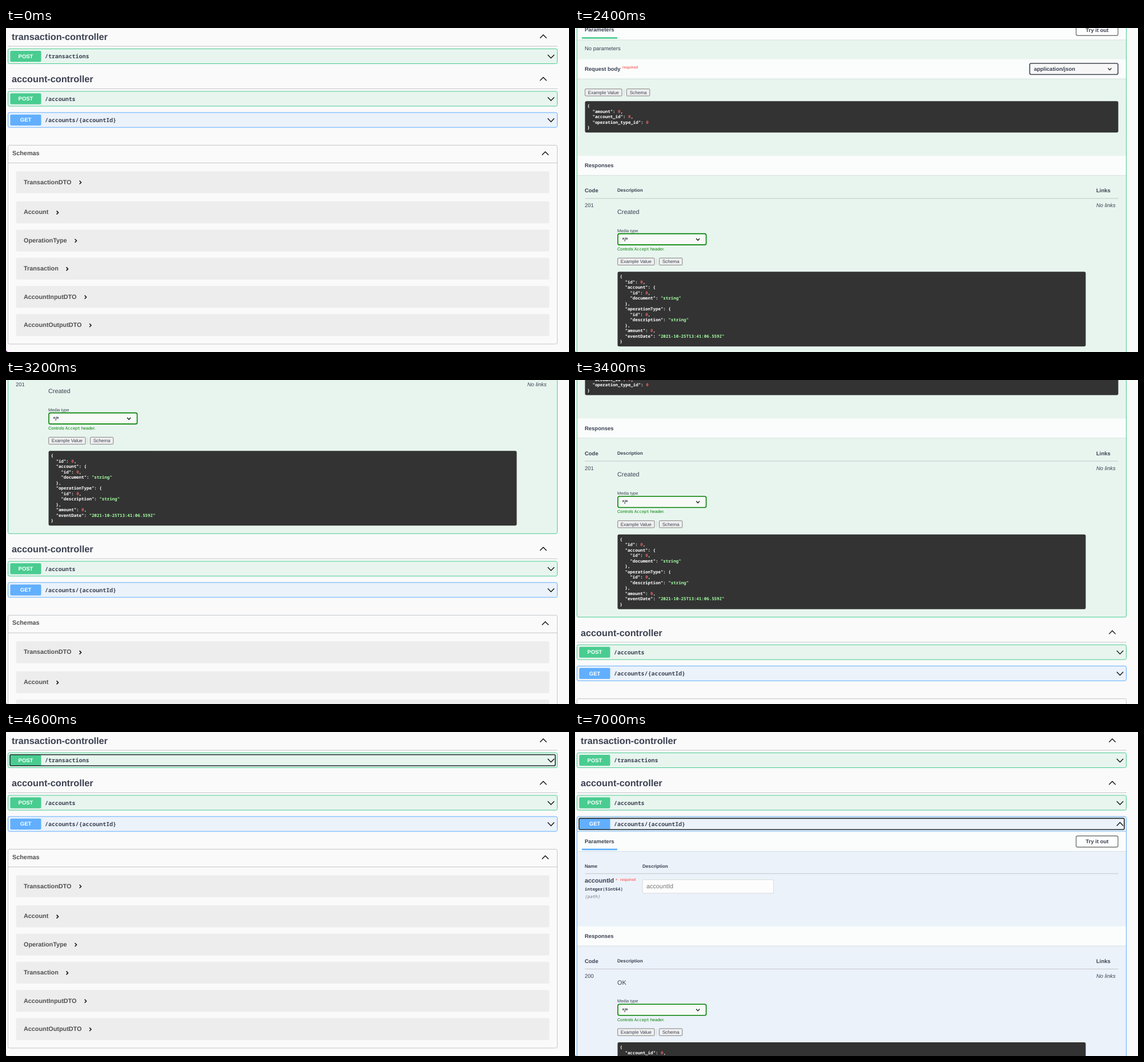
Recreate the animation shown at these times as an HTML page. Size 985x568 px, loop 8 s.

```html
<!DOCTYPE html>
<html lang="en">
<head>
<meta charset="utf-8">
<title>API documentation</title>
<style>
  html, body { margin: 0; width: 100%; height: 100%; overflow: hidden; background: #fafafa; }
  svg { display: block; }
  text { font-family: "Liberation Sans", Arial, sans-serif; fill: #3b4151; white-space: pre; text-rendering: geometricPrecision; }
  .bold { font-weight: 700; }
  .italic { font-style: italic; }
  .mono { font-family: "Noto Sans Mono", "DejaVu Sans Mono", monospace; }
  .mid { text-anchor: middle; }
  .white { fill: #fff; }
  .gray { fill: #505050; }
  .dim { fill: #777; }
  .red { fill: #ff6a6a; }
  .green { fill: #008000; }
  .num { fill: #d36363; }
  .str { fill: #a2fca2; }
</style>
</head>
<body>
<svg id="stage" width="985" height="568" viewBox="0 0 985 568"></svg>
<script>
const stage = document.getElementById('stage');
const RULE = '#c4c6ca', INK = '#3b4151';
const THEMES = {
  POST: { main: '#49cc90', tint: '#e8f5ef' },
  GET: { main: '#61affe', tint: '#ebf2fa' },
};

const OPERATIONS = [
  { method: 'POST', path: '/transactions', y: 0, grow: 586.5, responseShift: 0, code: 201, status: 'Created',
    body: { amount: 0, account_id: 0, operation_type_id: 0 }, bodyHeight: 55,
    response: { id: 0, account: { id: 0, document: 'string' },
      operationType: { id: 0, description: 'string' }, amount: 0, eventDate: '2021-10-25T13:41:06.559Z' } },
  { method: 'POST', path: '/accounts', y: 74.5, grow: 580, responseShift: -6.8, code: 201, status: 'Created',
    body: { document: 'string' }, bodyHeight: 48.3,
    response: { account_id: 0, document: 'string' } },
  { method: 'GET', path: '/accounts/{accountId}', y: 111.7, grow: 500, responseShift: -71.7, code: 200, status: 'OK',
    response: { account_id: 0, document: 'string' } },
];

const MODELS = [['TransactionDTO', 130], ['Account', 90], ['OperationType', 122],
  ['Transaction', 107], ['AccountInputDTO', 139], ['AccountOutputDTO', 147.5]];

const text = (x, y, content, size = 9.48, cls = '') =>
  `<text x="${x}" y="${y}" font-size="${size}" class="${cls}">${content}</text>`;
const box = (x, y, right, bottom, fill, stroke = 'none', width = 1, radius = 2.7) =>
  `<rect x="${x}" y="${y}" width="${right - x}" height="${bottom - y}" rx="${radius}" fill="${fill}" stroke="${stroke}" stroke-width="${width}"/>`;
const rule = (x, y, right, color = RULE) => box(x, y - .5, right, y + .5, color, 'none', 0, 0);
const group = (dy, content) => `<g transform="translate(0 ${dy})">${content}</g>`;
const chevron = (x, y, rx, ry, width = 1.4) =>
  `<path d="M${x - rx} ${y - ry}L${x} ${y + ry}L${x + rx} ${y - ry}" fill="none" stroke="#111" stroke-width="${width}"/>`;
const band = (y, bottom) =>
  box(4, y, 964, bottom, '#fafdfc', 'none', 0, 0) + rule(4, bottom + .3, 964, 'rgba(0,0,0,.09)');

function select(x, y, label, color, fill) {
  return box(x, y, x + 154.5, y + 19.5, fill, color, 1.6)
    + text(x + 7.5, y + 13.2, label, 9.48, 'bold') + chevron(x + 140, y + 10, 3, 1.6, 1.3);
}

function tabs(x, y) {
  const button = (left, right, label) => box(left, y, right, y + 12.3, '#efefef', '#777', .9, 1.2)
    + text((left + right) / 2, y + 9.1, label, 8.12, 'mid');
  return button(x, x + 64.3, 'Example Value') + box(x + 67.8, y, x + 68.6, y + 12.3, '#ccc')
    + button(x + 72.7, x + 113, 'Schema');
}

function codeBlock(x, y, right, height, value) {
  const lines = JSON.stringify(value, null, 2).split('\n').map((line, i) => {
    const colored = line.replace(/(: )(".*?"|\d+)/, (_, colon, token) =>
      `${colon}<tspan class="${token[0] === '"' ? 'str' : 'num'}">${token}</tspan>`);
    return text(x + 4, y + 11.2 + i * 9.48, colored, 7.45, 'mono bold white');
  });
  return box(x, y, right, y + height, '#333') + lines.join('');
}

const requestBody = op => text(17, 116, 'No parameters')
  + band(131.5, 165.6) + text(17, 151.7, 'Request body', 9.48, 'bold')
  + text(83, 147.8, 'required', 6.77, 'bold red')
  + select(795.5, 138.7, 'application/json', '#41444e', '#f7f7f7')
  + tabs(17.7, 183.5) + codeBlock(17.5, 204.9, 950.5, op.bodyHeight, op.body);

const pathParameter = () => text(17, 126.3, 'Name', 8.12, 'bold')
  + text(118, 126.3, 'Description', 8.12, 'bold') + rule(17.5, 136.5, 950.5)
  + text(17, 152.8, 'accountId', 10.83, 'bold') + text(71, 151.5, '*', 9, 'red')
  + text(79, 149.5, 'required', 6.77, 'bold red')
  + text(17, 166.3, 'integer($int64)', 7.45, 'mono bold')
  + text(17, 179.3, '(path)', 7.45, 'mono italic dim')
  + box(118, 147.2, 347.5, 171, '#fdfdfd', '#d9d9d9')
  + text(125, 162.7, 'accountId', 10.83, 'dim');

const responses = op => band(300.8, 334.8) + text(17, 320.9, 'Responses', 9.48, 'bold')
  + text(17, 364.9, 'Code', 9.48, 'bold') + text(74, 364.1, 'Description', 8.12, 'bold')
  + text(912, 364.9, 'Links', 9.48, 'bold') + rule(17.5, 375.5, 950.5)
  + text(17, 391.2, op.code) + text(912, 391.2, 'No links', 9.48, 'italic')
  + text(74, 402.8, op.status, 10.83) + text(74, 434.3, 'Media type', 7.45)
  + select(75, 437.3, '*/*', '#008000', '#f7faf7')
  + text(74, 466.5, 'Controls <tspan class="mono" font-size="7.2">Accept</tspan> header.', 7.45, 'green')
  + tabs(74.7, 480) + codeBlock(74.5, 504, 893.5, 131, op.response);

function operation(op, open, focused) {
  const { main, tint } = THEMES[op.method];
  let out = box(3.5, 36.5, 964.5, open ? 62.5 + op.grow : 62.5, tint, main);
  if (open) {
    out += rule(4, 62.5, 964, main) + band(63, 97.3)
      + text(17, 83.2, 'Parameters', 9.48, 'bold') + box(12, 92.8, 74, 95.5, main, 'none', 0, 0)
      + box(876.7, 70.5, 950, 90, '#fdfefe', '#777', 1.4) + text(913.5, 83.4, 'Try it out', 9.48, 'bold mid')
      + (op.body ? requestBody(op) : pathParameter())
      + group(op.responseShift, responses(op));
  }
  out += box(7.4, 40, 61.5, 59.2, main, 'none', 0, 2)
    + text(34.5, 52.8, op.method, 9.48, 'bold white mid')
    + text(68, 53.4, op.path, 9.93, 'mono bold');
  if (focused) out += box(7, 39.7, 961, 59.3, 'none', '#202a2c', 1.6, 2);
  return out + chevron(953.5, 49.8, 5.7, open ? -2.9 : 2.9);
}

const heading = name => text(10, 20.9, name, 16.25, 'bold')
  + chevron(940, 14.8, 5.7, -2.9) + rule(3.5, 32, 965);

function schemas() {
  const rows = MODELS.map(([name, arrowX], i) => {
    const y = i ? 254.6 + i * 49.4 : 251.2;
    return box(17.5, y, 950.5, y + 38.4, '#ededed') + text(31, y + 22.3, name, 10.83, 'bold gray')
      + `<path d="M${arrowX - 1.5} ${y + 16.6}l3 3l-3 3" fill="none" stroke="#111" stroke-width="1.5"/>`;
  });
  return box(3.5, 205.5, 964.5, 554, 'none', RULE) + rule(4, 236.5, 964)
    + text(11, 222.7, 'Schemas', 10.83, 'bold gray') + chevron(943.5, 219.8, 5.7, -2.9) + rows.join('');
}

function page(open, focus) {
  let shift = 0, out = heading('transaction-controller');
  OPERATIONS.forEach((op, i) => {
    if (i === 1) out += group(shift + 74.5, heading('account-controller'));
    out += group(shift + op.y, operation(op, i === open, i === focus));
    if (i === open) shift += op.grow;
  });
  return out + group(shift, schemas());
}

// [start time, open operation, focused operation]; -1 means none
const STATES = [[0, -1, -1], [1200, -1, 0], [1400, 0, 0], [4600, -1, 0], [5300, -1, 1],
  [5500, 1, 1], [6300, -1, 1], [6900, -1, 2], [7000, 2, 2]];
const SCROLL = [[2300, 0], [2400, 76.7], [2800, 200], [3200, 379.7], [3300, 330], [3600, 40], [3700, 0]];

function scrollAt(time) {
  const t = Math.floor(time / 100) * 100;
  const next = SCROLL.findIndex(([at]) => at > t);
  if (next < 1) return 0;
  const [t0, y0] = SCROLL[next - 1], [t1, y1] = SCROLL[next];
  return y0 + (y1 - y0) * (t - t0) / (t1 - t0);
}

let shown = '';
function frame() {
  const time = performance.now() % 8000;
  const [start, open, focus] = STATES.findLast(([at]) => at <= time);
  const scroll = scrollAt(time), key = `${start}/${scroll}`;
  if (key !== shown) {
    shown = key;
    const corner = start ? '<path d="M0 566l2 2h-2z" fill="#888"/>' : '<path d="M0 565l3 3h-3z" fill="#702070"/>';
    stage.innerHTML = group(-scroll, page(open, focus)) + corner;
  }
  requestAnimationFrame(frame);
}
frame();
</script>
</body>
</html>
```
